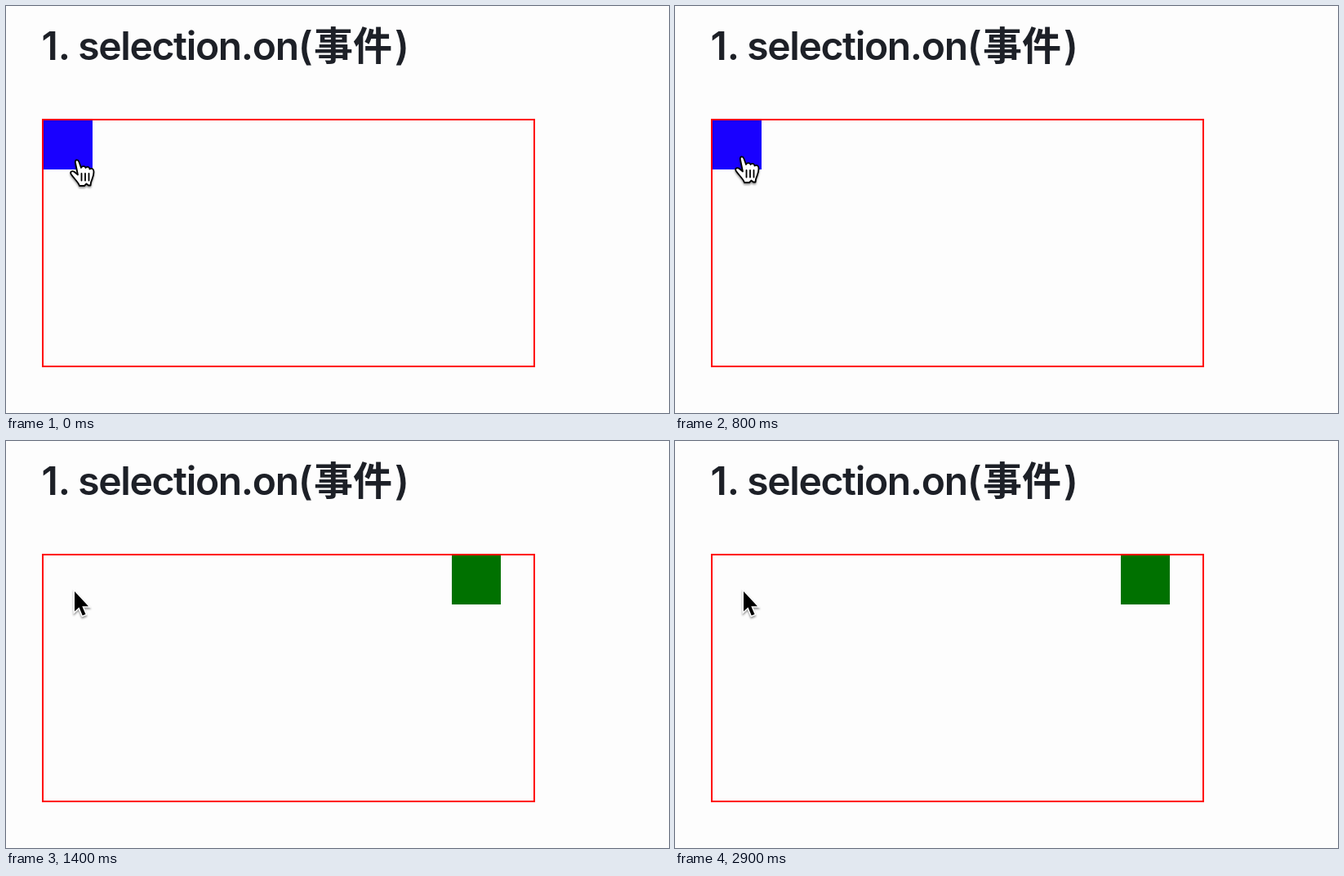
An HTML page for the animation above (3000 ms loop, 812 by 498 pixels).

```html
<!DOCTYPE html>
<html lang="zh">
<head>
<meta charset="utf-8">
<style>
  html, body { margin: 0; width: 100%; height: 100%; overflow: hidden; background: #fdfdfd; }
  svg { display: block; }
  text { font: 600 48px Inter, "Noto Sans CJK SC", "Noto Sans CJK", sans-serif; fill: #1d2027; }
  .tight { letter-spacing: -1.35px; }
  .shadow { filter: drop-shadow(0 2px 1px #0006); }
</style>
</head>
<body>
<svg width="812" height="498" viewBox="0 0 812 498">
  <text x="43.5" y="66">1.</text>
  <text class="tight" x="88.2" y="66">selection.on(</text>
  <text x="377" y="65.500">事件</text>
  <text x="476" y="66">)</text>
  <rect id="square" x="46" y="140" width="60" height="60"/>
  <rect x="45" y="139" width="602" height="302" fill="none" stroke="#f00" stroke-width="2"/>
  <g id="hand" class="shadow" fill="#fff" stroke="#000" stroke-width="1.8" stroke-linejoin="round" stroke-linecap="round">
    <path d="M85 192C84 188 88 187 89.500 191L92 198C93 195.500 97 195.500 97.500 198C99 196 102 196.500 102.500 199.500C105 198 107.500 199 107.500 203C107.500 209 105 212 104 216L103.500 219.500H101L98.500 217.500L96 220H90C89 216 84 212 79.500 205.500C78 202 82 201 85 204L88 206.500Z"/>
    <path d="M92.500 205V213.500M97 205V213.500M101.500 205V213.500"/>
  </g>
  <path id="arrow" class="shadow" fill="#000" stroke="#fff" stroke-width="3" paint-order="stroke"
    d="M84 184V208.500L89.500 203.500L93.700 213.500L97.500 212L93.300 202.200H101Z"/>
</svg>
<script>
  const LOOP = 3000, STEP = 100, CLICK = 837.6, DURATION = 250;
  const BLUE = [25, 0, 255], GREEN = [0, 113, 0];
  const [square, hand, arrow] = ['square', 'hand', 'arrow'].map(id => document.getElementById(id));

  const clamp = v => Math.min(1, Math.max(0, v));
  const cubicInOut = t => t < 0.5 ? 4 * t ** 3 : 1 - (2 - 2 * t) ** 3 / 2;
  const mix = (a, b, k) => `rgb(${a.map((v, i) => Math.round(v + (b[i] - v) * k))})`;

  function draw(time) {
    const t = Math.floor(time % LOOP / STEP) * STEP;
    const progress = cubicInOut(clamp((t - CLICK) / DURATION));
    const x = Math.round(46 + 500 * progress);
    square.setAttribute('x', x);
    square.setAttribute('fill', mix(BLUE, GREEN, progress));

    const drift = 1 - (1 - clamp(t / 400)) ** 2;
    hand.setAttribute('transform', `translate(${-5 * drift} ${-4 * drift})`);
    const hovering = x < 82;
    hand.style.display = hovering ? '' : 'none';
    arrow.style.display = hovering ? 'none' : '';
  }

  const start = performance.now();
  (function tick() {
    draw(performance.now() - start);
    requestAnimationFrame(tick);
  })();
</script>
</body>
</html>
```
